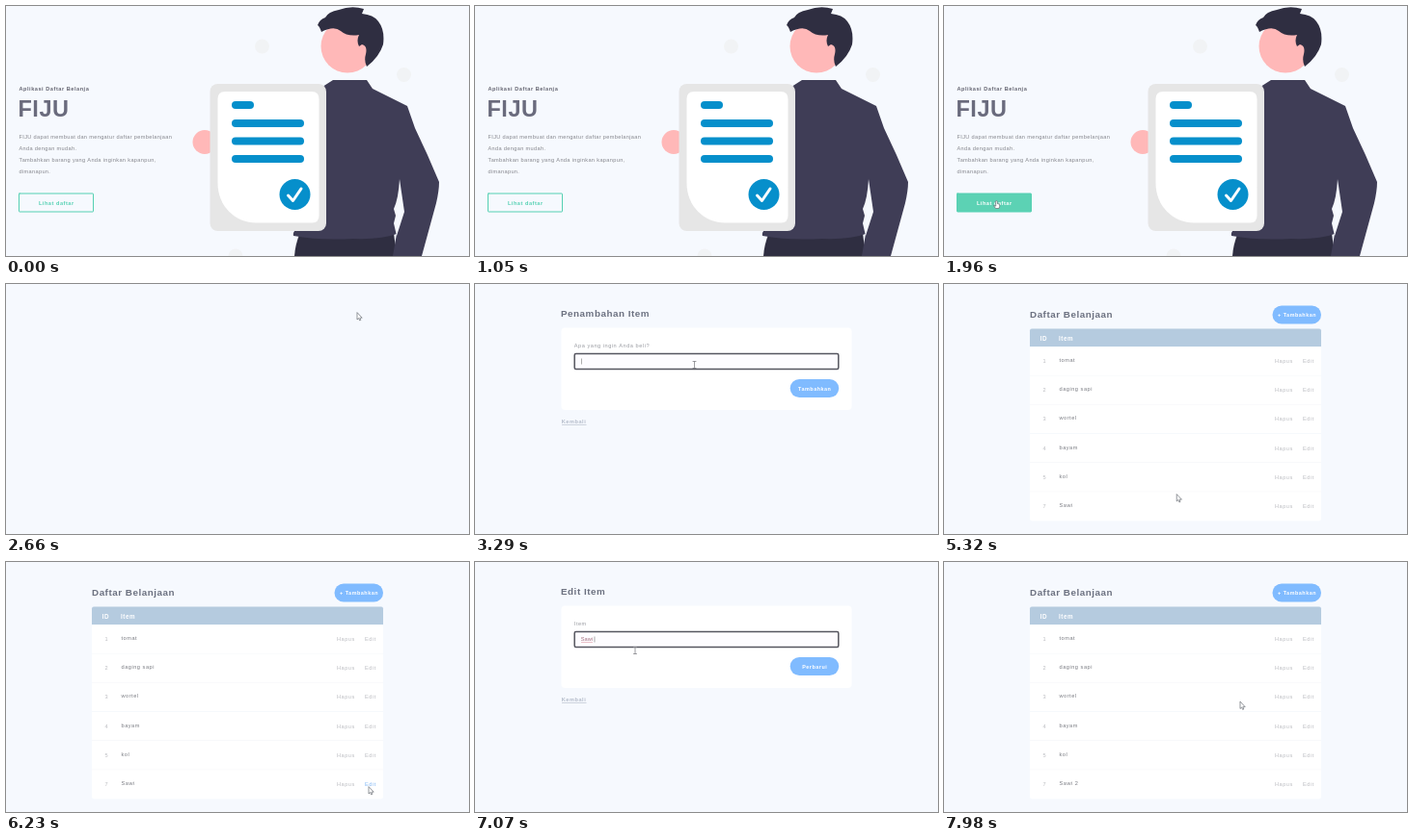
Animation, 480 px wide and 260 px high, one loop 8000 ms. Source, as an HTML page with a canvas:

```html
<!DOCTYPE html>
<html lang="id">
<head>
<meta charset="utf-8">
<title>Daftar Belanja</title>
<style>
html, body { margin: 0; width: 100%; height: 100%; overflow: hidden; background: #f6f9fe; }
canvas { display: block; width: 480px; height: 260px; }
</style>
</head>
<body>
<canvas id="stage"></canvas>
<script>
const LOOP = 8000, STEP = 70;
const BG = '#f6f9fe', NAVY = '#3f3d56', DARK = '#2f2e41', SKIN = '#ffb8b8';
const BLUE = '#068fcb', TEAL = '#55d0b3', BUTTON = '#80bbff';

const canvas = document.getElementById('stage');
const ctx = canvas.getContext('2d');
const ratio = window.devicePixelRatio || 1;
canvas.width = 480 * ratio;
canvas.height = 260 * ratio;

const clamp = v => Math.max(0, Math.min(1, v));
const ease = v => v * v * (3 - 2 * v);

function text(str, x, y, color, { size = 5.6, bold = false, space = 0.53, align = 'left' } = {}) {
  ctx.font = `${bold ? 'bold ' : ''}${size}px "Liberation Sans", Arial, sans-serif`;
  ctx.letterSpacing = space + 'px';
  ctx.textAlign = align;
  ctx.fillStyle = color;
  ctx.fillText(str, x, y);
  return ctx.measureText(str).width;
}

function box(x, y, w, h, r, fill, stroke, line = 1) {
  ctx.beginPath();
  ctx.roundRect(x, y, w, h, r);
  if (fill) { ctx.fillStyle = fill; ctx.fill(); }
  if (stroke) { ctx.strokeStyle = stroke; ctx.lineWidth = line; ctx.stroke(); }
}

function disc(x, y, r, fill) {
  ctx.beginPath();
  ctx.arc(x, y, r, 0, Math.PI * 2);
  ctx.fillStyle = fill;
  ctx.fill();
}

function shape(d, fill) {
  ctx.fillStyle = fill;
  ctx.fill(new Path2D(d));
}

function stroke(d, color, width) {
  ctx.strokeStyle = color;
  ctx.lineWidth = width;
  ctx.stroke(new Path2D(d));
}

function drawPerson() {
  for (const [x, y] of [[265.5, 42], [412.5, 71.5], [238, 260]]) disc(x, y, 7.5, '#f1f3f5');
  disc(206, 141.5, 12.5, SKIN);
  shape('M304 238 Q300 248 299 260 H405 L402 236Z', DARK);
  shape('M339 77 H374 L380 86 L416 104 L424 127 L437 155 L449 183 Q449 192 446 205 L431 260 H401 '
    + 'L405 237 Q390 243 360 242 Q325 244 298 239 Q297 236 301 231 L325 226 V86Z', NAVY);
  shape('M408 180 Q407 200 402 211 L404 218 L402 226 L405 239 L413 214Z', BG);
  disc(354, 42, 27.5, SKIN);
  shape('M327 27 Q325 21 323 20 Q325 14 331 12 Q334 6 345 4 Q358 -1 371 3 L369 8 Q381 9 386 16 '
    + 'Q393 25 391 40 Q387 53 374 63 Q371 57 373 50 Q375 41 369 40 L366 42 Q363 36 366 30 '
    + 'Q354 32 347 26 Q340 20 327 27Z', DARK);
}

function drawClipboard() {
  box(211.5, 81, 120.5, 153, 8, '#e6e6e6');
  shape('M227 89 H317 Q324.5 89 324.5 96.5 V218 Q324.5 225.5 317 225.5 H260 '
    + 'C237 225.5 219.5 208 219.5 184 V96.5 Q219.5 89 227 89Z', '#fff');
  box(234, 99, 23, 8, 4, BLUE);
  for (const y of [118, 136.5, 155]) box(234, y, 75, 8, 4, BLUE);
  disc(299.5, 196, 16, BLUE);
  ctx.lineCap = ctx.lineJoin = 'round';
  stroke('M292.5 197 L297.5 202.5 L306 190', '#fff', 3);
}

function drawLanding(t) {
  drawPerson();
  drawClipboard();
  text('Aplikasi Daftar Belanja', 13.5, 88, '#63636f', { bold: true });
  text('FIJU', 12.5, 115, '#6a6b7d', { size: 23.5, bold: true, space: 0.5 });
  ['FIJU dapat membuat dan mengatur daftar pembelanjaan', 'Anda dengan mudah.',
    'Tambahkan barang yang Anda inginkan kapanpun,', 'dimanapun.']
    .forEach((line, i) => text(line, 13.5, 138 + i * 12, '#85868c', { space: 0.35 }));
  const hover = clamp((t - 1540) / 140);
  box(13.5, 195, 77, 19, 0.5, `rgba(92,210,180,${hover})`, TEAL);
  text('Lihat daftar', 52.3, 206.6, hover > 0.5 ? '#fff' : TEAL, { bold: true, align: 'center' });
}

function pill(x, y, label) {
  box(x, y, 50.5, 19, 9.5, BUTTON);
  text(label, x + 25.5, y + 11.6, '#fff', { size: 5.4, bold: true, align: 'center' });
}

const title = str => text(str, 89, 34, '#6c7180', { size: 9.83, bold: true });

function drawList(items, hoverLast) {
  text('Daftar Belanjaan', 89, 35, '#6c7180', { size: 9.83, bold: true });
  pill(340.5, 22.5, '+ Tambahkan');
  box(89, 46.5, 302, 18.7, [2, 2, 0, 0], '#b5cbdf');
  text('ID', 99.8, 58.5, '#fff', { size: 6.3, bold: true });
  text('Item', 119, 58.5, '#fff', { size: 6.3, bold: true });
  items.forEach(([id, name], i) => {
    const y = 65.2 + i * 30.2;
    const last = i === items.length - 1;
    box(89, y, 302, 30.2, last ? [0, 0, 3, 3] : 0, '#fff');
    if (!last) box(89, y + 29.7, 302, 0.6, 0, '#f1f4f8');
    text(id, 104.4, y + 16.8, '#b9babf', { align: 'center' });
    text(name, 119.5, y + 15.8, '#787a80');
    text('Hapus', 343, y + 16.8, '#bbbcc1');
    text('Edit', 372, y + 16.8, last && hoverLast ? '#82b8f5' : '#bbbcc1');
  });
}

function drawForm({ heading, label, action, value, focused, checked }) {
  title(heading);
  box(89.5, 45.5, 301, 85.5, 4, '#fff');
  text(label, 102.8, 65.6, '#999ba1');
  if (focused) box(103.2, 72.6, 273.6, 16, 1.5, '#fdfcff', '#55555f', 1.5);
  else box(103.2, 72.6, 273.6, 16, 1.5, '#fff', '#dfe3ea', 0.7);
  const width = value ? text(value, 109.8, 82.4, checked ? '#a26c7c' : '#7b7d84', { space: 0 }) : 0;
  if (checked) box(110, 83.3, 12, 0.6, 0, '#e09aa4');
  if (focused) box(110 + width, 77.5, 0.6, 6, 0, '#777');
  pill(326.7, 99, action);
  text('Kembali', 89.8, 145, '#b3bbc9', { bold: true });
  box(90, 146, 25.5, 0.6, 0, '#b3bbc9');
}

const produce = [[1, 'tomat'], [2, 'daging sapi'], [3, 'wortel'], [4, 'bayam'], [5, 'kol']];
const typed = t => 'Sawi'.slice(0, [3500, 3640, 3780, 4060].filter(at => t >= at).length);
const edited = t => 'Sawi' + (t >= 7210 ? ' 2' : t >= 7070 ? ' ' : '');

// Each scene runs from start to end and fades in over fade ms.
const scenes = [
  { start: 0, end: 2030, fade: 0, draw: drawLanding },
  { start: 2240, end: 2660, fade: 210, draw: () => drawList(produce) },
  { start: 2730, end: 4690, fade: 350, draw: t => drawForm({
    heading: 'Penambahan Item', label: 'Apa yang ingin Anda beli?', action: 'Tambahkan',
    value: typed(t), focused: t >= 3220 && t < 4550 }) },
  { start: 4760, end: 6300, fade: 280, draw: t => drawList([...produce, [7, 'Sawi']], t >= 6090) },
  { start: 6370, end: 7560, fade: 280, draw: t => drawForm({
    heading: 'Edit Item', label: 'Item', action: 'Perbarui',
    value: edited(t), focused: t >= 6930 && t < 7490, checked: t >= 6930 }) },
  { start: 7630, end: LOOP, fade: 280, draw: () => drawList([...produce, [7, 'Sawi 2']]) }
];

// Pointer moves: start, end, destination.
const moves = [
  [1330, 1610, 54.5, 203], [2240, 2520, 364, 30], [2800, 3220, 227.5, 84],
  [4200, 4480, 338, 115], [4760, 5460, 230, 231], [5530, 6090, 376, 234],
  [6370, 6930, 166, 92], [7280, 7490, 338, 114], [7630, 7980, 307, 145.5]
];

function pointerAt(t) {
  let x = 100, y = 262;
  for (const [from, to, toX, toY] of moves) {
    const k = ease(clamp((t - from) / (to - from)));
    x += (toX - x) * k;
    y += (toY - y) * k;
  }
  return [x, y];
}

function drawPointer(t) {
  if (t < 1330) return;
  const [x, y] = pointerAt(t);
  const beam = (t >= 3150 && t < 4270) || (t >= 6860 && t < 7350);
  const hand = t >= 1540 && t < 2030;
  ctx.save();
  ctx.translate(x, y);
  ctx.lineCap = ctx.lineJoin = 'round';
  if (beam) {
    stroke('M-1.5 -3.5 H1.5 M0 -3.5 V3.5 M-1.5 3.5 H1.5', '#85858b', 0.8);
  } else {
    const d = hand
      ? 'M-1 0 Q0 -1 .7 0 V2.5 L3.2 3.2 V5.5 L2.4 7.5 H-1 L-3 4.5 L-1 5Z'
      : 'M0 0 V7 L1.6 5.6 L2.7 8 L3.8 7.5 L2.8 5.2 H4.8Z';
    shape(d, '#fff');
    stroke(d, '#666a72', 0.7);
  }
  ctx.restore();
}

function render(now) {
  const t = Math.floor((now % LOOP) / STEP) * STEP;
  ctx.setTransform(ratio, 0, 0, ratio, 0, 0);
  ctx.globalAlpha = 1;
  ctx.fillStyle = BG;
  ctx.fillRect(0, 0, 480, 260);
  const scene = scenes.find(s => t >= s.start && t < s.end);
  if (scene) {
    ctx.globalAlpha = scene.fade ? clamp((t - scene.start + STEP) / scene.fade) : 1;
    scene.draw(t);
    ctx.globalAlpha = 1;
  }
  drawPointer(t);
}

const origin = performance.now();
function tick() {
  render(performance.now() - origin);
  requestAnimationFrame(tick);
}
tick();
</script>
</body>
</html>
```
